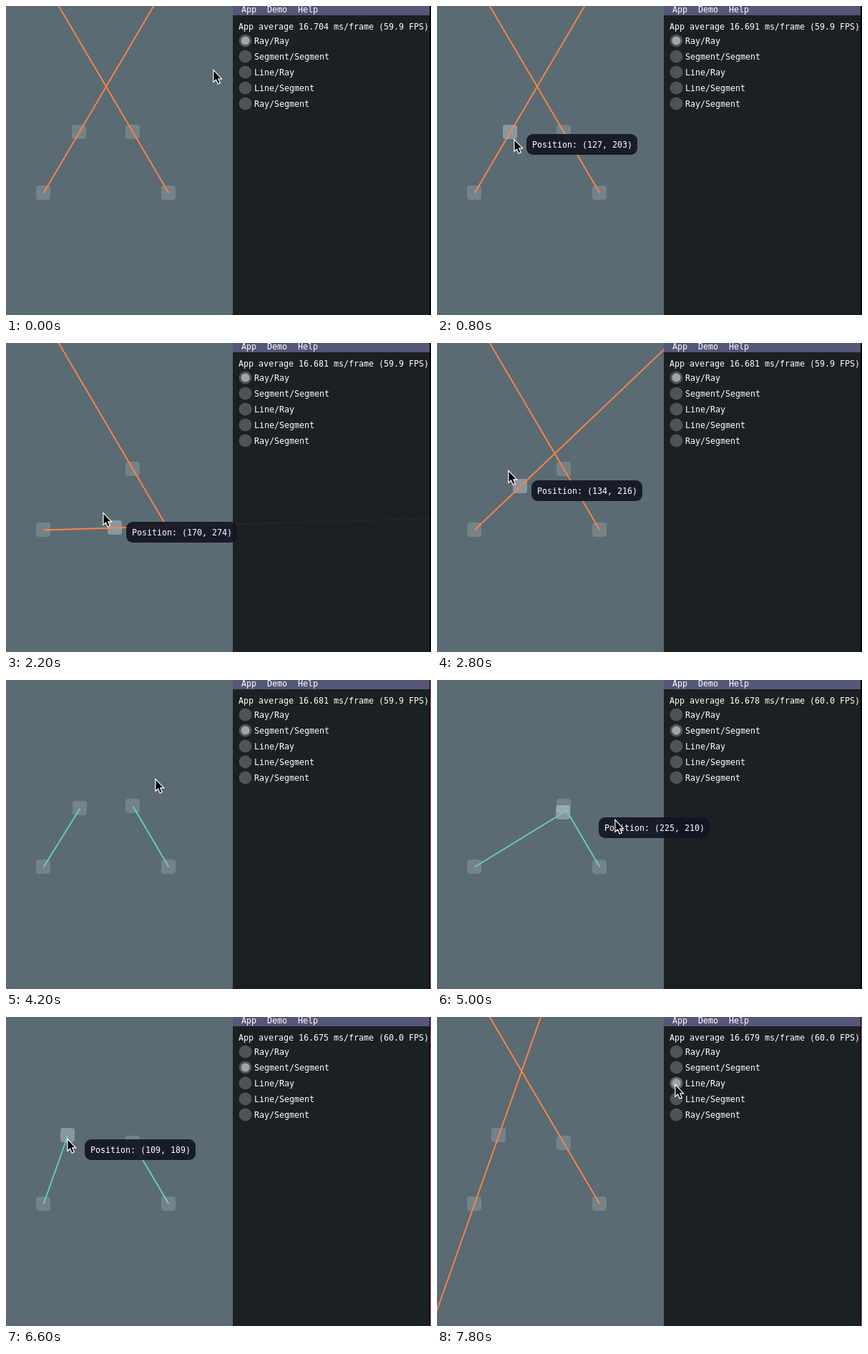
These frames come from a looping animation (594x432 px, 8 s). An HTML page with a canvas:

```html
<!DOCTYPE html>
<html lang="en">
<head>
<meta charset="utf-8">
<title>Line intersection demo</title>
<style>
  html, body { margin: 0; width: 100%; height: 100%; overflow: hidden; background: #000; }
  canvas { display: block; width: 594px; height: 432px; }
</style>
</head>
<body>
<canvas id="stage" width="594" height="432"></canvas>
<script>
const ctx = document.getElementById('stage').getContext('2d');
const LOOP = 8000, STEP = 200, FAR = 12;
const LABELS = ['Ray/Ray', 'Segment/Segment', 'Line/Ray', 'Line/Segment', 'Ray/Segment'];
// Parameter range along a pair of handles
const RANGES = { Ray: [0, FAR], Segment: [0, 1], Line: [-FAR, FAR] };
const A = [52, 261], C = [227, 261], D = [177, 176];

// The pointer path: time, x, y. Handle and tooltip follow it with a delay.
const POINTER = [
  [0, 290, 89], [600, 98, 174], [1200, 127, 211], [1400, 135, 229], [1900, 154, 266],
  [2800, 100, 178], [3000, 99, 177], [3700, 333, 72], [4200, 209, 138], [4600, 103, 184],
  [5000, 249, 195], [5460, 245, 191], [5600, 238, 191], [6400, 86, 170], [6800, 86, 170], [7600, 333, 94]
];
const HANDLE_LAG = 200, TIP_LAG = 130;
const DRAGS = [
  { start: 600, end: 3000, grip: [4, 2], reading: [26, 25] },
  { start: 4600, end: 6800, grip: [0, -5], reading: [23, 19] }
];
const FRAME_MS = [[0, 16.704], [1400, 16.681], [4200, 16.681], [6200, 16.674], [7800, 16.679]];

function at(keys, t) {
  const i = keys.findIndex(key => key[0] > t);
  if (i < 0) return keys[keys.length - 1].slice(1);
  const a = keys[i - 1], b = keys[i], u = (t - a[0]) / (b[0] - a[0]);
  return a.slice(1).map((v, j) => v + (b[j + 1] - v) * u);
}

function follow(t, lag, { start, end }, [dx, dy]) {
  const [x, y] = at(POINTER, Math.min(Math.max(t - lag, start), end));
  return [Math.round(x + dx), Math.round(y + dy)];
}

function crossing(p, q, r, s, first, second) {
  const [ux, uy] = [q[0] - p[0], q[1] - p[1]], [vx, vy] = [s[0] - r[0], s[1] - r[1]];
  const [wx, wy] = [r[0] - p[0], r[1] - p[1]], det = ux * vy - uy * vx;
  if (!det) return false;
  const inside = (k, [lo, hi]) => k >= lo && k <= hi;
  return inside((wx * vy - wy * vx) / det, first) && inside((wx * uy - wy * ux) / det, second);
}

function rect(x, y, w, h, color, radius = 0) {
  ctx.fillStyle = color;
  ctx.beginPath();
  ctx.roundRect(x, y, w, h, radius);
  ctx.fill();
}

function disc(x, y, r, color) {
  ctx.fillStyle = color;
  ctx.beginPath();
  ctx.arc(x, y, r, 0, Math.PI * 2);
  ctx.fill();
}

function text(str, x, y) {
  ctx.fillStyle = '#fff';
  ctx.fillText(str, x, y);
}

function line(p, q, [lo, hi], color) {
  const point = k => [p[0] + .5 + (q[0] - p[0]) * k, p[1] + .5 + (q[1] - p[1]) * k];
  ctx.strokeStyle = color;
  ctx.lineWidth = 1.9;
  ctx.beginPath();
  ctx.moveTo(...point(lo));
  ctx.lineTo(...point(hi));
  ctx.stroke();
}

function panel(t, mode, [mx, my]) {
  rect(317, 0, 275, 432, 'rgba(20,23,25,.89)');
  rect(317, 0, 275, 13, '#555678');
  text('App', 329, 9);
  text('Demo', 365, 9);
  text('Help', 408, 9);
  const [ms] = at(FRAME_MS, t);
  text(`App average ${ms.toFixed(3)} ms/frame (${(1000 / ms).toFixed(1)} FPS)`, 325, 33);
  LABELS.forEach((label, i) => {
    const y = 48.5 + 22 * i;
    const hover = Math.hypot(mx - 334.5, my - y) < 9;
    disc(334.5, y, 9, hover ? '#686a6b' : '#505354');
    if (i === mode) disc(334.5, y, 6, '#a3a4a4');
    text(label, 347, y + 4.5);
  });
  // The window edge flickers mauve every sixth step
  rect(592, 0, 2, 432, '#000');
  if (t % (6 * STEP) === 3 * STEP) rect(593, 0, 1, 432, '#93608a');
}

function tooltip([x, y], reading) {
  rect(x, y, 155, 29, 'rgba(18,20,36,.91)', 9);
  text(`Position: (${reading.join(', ')})`, x + 8, y + 19);
}

function pointer([x, y]) {
  ctx.save();
  ctx.translate(x + .5, y + 2);
  const shape = new Path2D('M0 0V14L3.2 11 6 17.2 8 16.3 5.3 10.3H9.7Z');
  ctx.lineWidth = 2.4;
  ctx.strokeStyle = '#fff';
  ctx.stroke(shape);
  ctx.fillStyle = '#000';
  ctx.fill(shape);
  ctx.restore();
}

function draw(t) {
  const mode = t < 3700 ? 0 : t < 7600 ? 1 : 2;
  const drag = t < DRAGS[1].start ? DRAGS[0] : DRAGS[1];
  const dragging = t >= drag.start && t < drag.end;
  const B = follow(t, HANDLE_LAG, drag, drag.grip);
  const mouse = at(POINTER, t).map(Math.round);

  rect(0, 0, 594, 432, '#5a6b74');
  for (const p of [A, B, C, D]) {
    const active = dragging && p === B;
    rect(p[0] - 10, p[1] - 10, 20, 20, `rgba(255,255,255,${active ? .3 : .16})`, 4);
  }
  const [first, second] = LABELS[mode].split('/').map(kind => RANGES[kind]);
  const color = crossing(A, B, C, D, first, second) ? '#ff8349' : '#66cdc2';
  line(A, B, first, color);
  line(C, D, second, color);

  panel(t, mode, mouse);
  if (dragging) {
    tooltip(follow(t, TIP_LAG, drag, [24, 1]), follow(t, TIP_LAG, drag, drag.reading));
  }
  pointer(mouse);
}

ctx.font = '11.63px "DejaVu Sans Mono", monospace';
const start = performance.now();
function tick() {
  const t = (performance.now() - start) % LOOP;
  draw(Math.floor(t / STEP) * STEP);
  requestAnimationFrame(tick);
}
tick();
</script>
</body>
</html>
```
